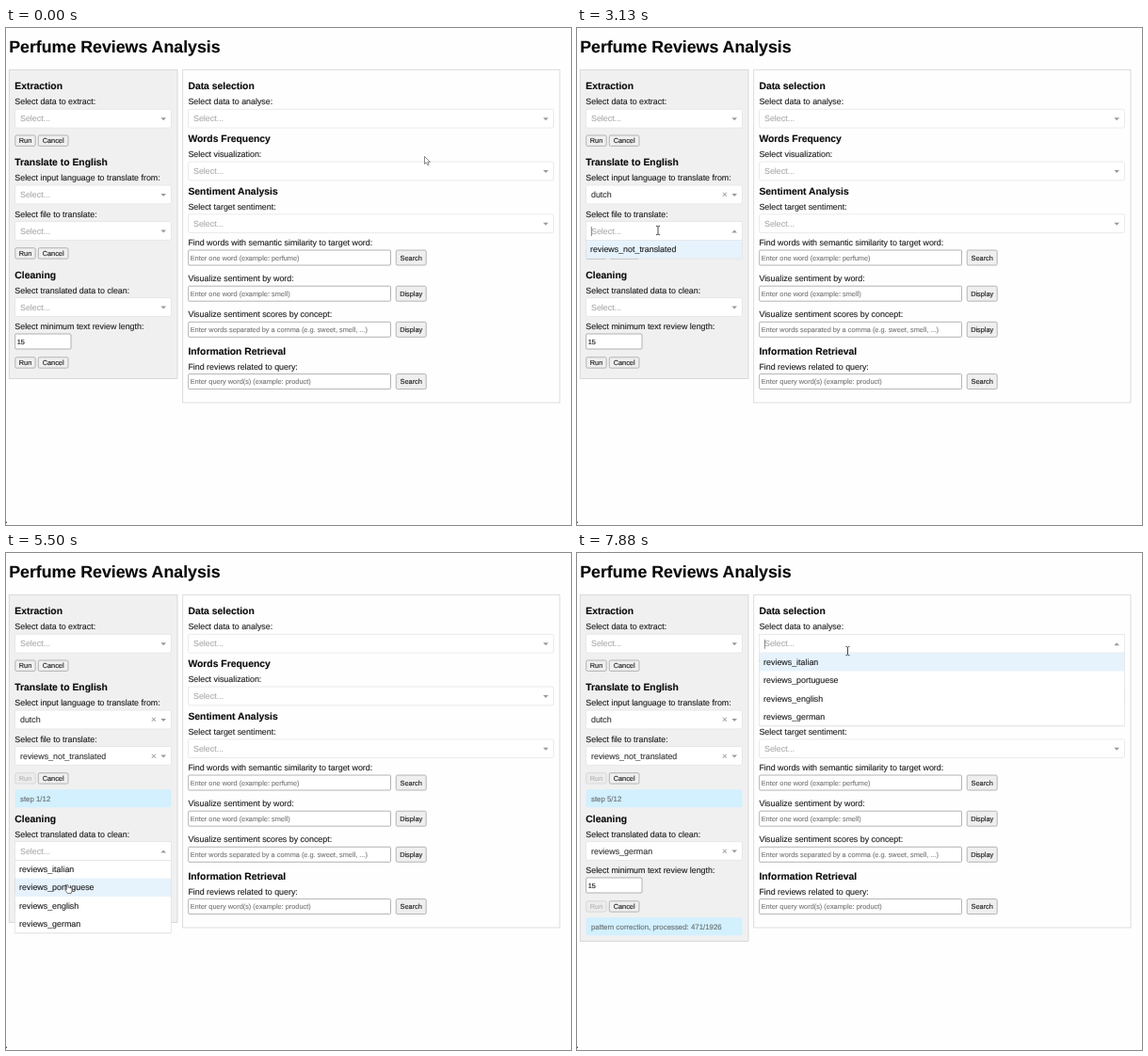
Animation, 600 px wide and 528 px high, one loop 8 s. Source, as an HTML page:

```html
<!DOCTYPE html>
<html lang="en">
<head>
<meta charset="utf-8">
<title>Perfume Reviews Analysis</title>
<style>
  html, body { margin: 0; width: 100%; height: 100%; overflow: hidden; background: #fefefe; }
  svg { display: block; width: 600px; height: 528px; }
  text { font-family: "Liberation Sans", Arial, sans-serif; text-rendering: geometricPrecision; white-space: pre; stroke-width: .12px; }
</style>
</head>
<body>
<svg id="stage" viewBox="0 0 600 528" xmlns="http://www.w3.org/2000/svg"></svg>
<script>
const stage = document.getElementById("stage");
const LOOP = 8000, TICK = 125;
const TITLE = 17.77, HEAD = 10.39, BODY = 8.88, SMALL = 7.37, ROW = 19.28;
const LEFT = { x: 9.5, w: 166 }, RIGHT = { x: 193.5, w: 388 };

const languages = ["spanish", "portuguese", "russian", "french", "german", "dutch", "italian", "chinese", "japanese"];
const reviews = ["italian", "portuguese", "english", "german"].map(n => "reviews_" + n);
const rawFile = "reviews_not_translated";

// Time, tip x, tip y, shape
const pointer = [
  [0, 444.5, 136.5, "arrow"], [750, 302.5, 158.5, "arrow"], [1000, 161, 176.5, "arrow"],
  [1625, 142, 203, "hand"], [1750, 112, 232, "hand"], [1875, 88, 252, "hand"], [2000, 80.5, 256, "hand"],
  [2625, 81, 250, "arrow"], [2750, 84, 232, "arrow"], [2875, 86, 215, "beam"],
  [3250, 84, 232, "hand"], [3500, 54, 230, "arrow"], [3625, 27, 237, "hand"], [3750, 22.5, 239, "hand"],
  [4000, 23, 241, "arrow"], [4250, 26, 254, "arrow"], [4500, 35, 282, "arrow"], [4625, 46, 302, "arrow"],
  [4875, 58.5, 323, "beam"], [5250, 60, 332, "hand"], [5375, 62, 342, "hand"], [5500, 64, 352, "hand"],
  [5750, 67, 371, "hand"], [5875, 69, 384, "hand"], [6000, 69.5, 391, "hand"],
  [6375, 52, 386, "arrow"], [6625, 19, 371, "hand"], [6750, 18, 370.5, "hand"],
  [7000, 38, 352, "arrow"], [7125, 94, 285, "arrow"], [7250, 175, 208, "arrow"], [7375, 243, 148.5, "arrow"],
  [7500, 268, 122, "arrow"], [7625, 285, 105, "beam"], [7750, 287.5, 104, "beam"]
];
const openMenu = [[0, ""], [1250, "lang"], [2500, ""], [3125, "file"], [3375, ""],
  [4875, "clean"], [6250, ""], [7875, "data"]];
const scrolls = [[0, 0], [2000, 14], [2125, 33.1]];
const translateLog = [[0, ""], [3750, "Processing..."], [4000, "Loading translator for 'dutch'..."],
  [5250, "step 1/12"], [5875, "step 2/12"], [6375, "step 3/12"], [6750, "step 4/12"], [7250, "step 5/12"]];
const carets = [[0, false], [1250, true], [1625, false], [3125, true], [3250, false],
  [4875, true], [5250, false], [7875, true]];

const held = (keys, t) => keys.filter(k => k[0] <= t).pop();
const value = (keys, t) => held(keys, t)[1];

function text(x, mid, s, size = BODY, fill = "#1c1c1c", more = "") {
  return `<text x="${x}" y="${mid + size * 0.36}" font-size="${size}" fill="${fill}" stroke="${fill}" ${more}>${s}</text>`;
}
const heading = (x, mid, s) => text(x, mid, s, HEAD, "#0c0c0c", 'font-weight="700"');

function rect(x, y, w, h, fill, stroke = "none", r = 0, more = "") {
  return `<rect x="${x}" y="${y}" width="${w}" height="${h}" rx="${r}" fill="${fill}" stroke="${stroke}" ${more}/>`;
}

function button(x, mid, w, h, label, off) {
  return rect(x, mid - h / 2, w, h, off ? "#ececec" : "#efefef", off ? "#cfcfcf" : "#9a9a9a", 1.5, 'stroke-width=".7"') +
    text(x + w / 2, mid, label, SMALL, off ? "#b4b4b4" : "#1a1a1a", 'text-anchor="middle"');
}
const runCancel = (mid, off) => button(9.8, mid, 21.4, 11.4, "Run", off) + button(34.3, mid, 31.7, 11.4, "Cancel");

function field(x, mid, w, label, fill = "#777") {
  return rect(x, mid - 8, w, 16, "#fff", "#a0a0a0", 1, 'stroke-width=".8"') + text(x + 2, mid, label, SMALL, fill);
}
const search = (mid, hint, label) => field(193.7, mid, 214.8, hint) + button(414.2, mid, 32, 16, label);

function triangle(x, y, up) {
  const d = up ? -1.5 : 1.5;
  return `<path d="M${x - 2.8} ${y - d}h5.6l-2.8 ${2 * d}z" fill="#999"/>`;
}

function select(col, mid, chosen, open, caret) {
  const end = col.x + col.w;
  let s = rect(col.x, mid - 9.9, col.w, 19.8, "#fff", "#dcdcdc", open ? 0 : 2, 'stroke-width=".6"') +
    text(col.x + 5.5, mid, chosen || "Select...", BODY, chosen ? "#333" : "#aaa") +
    triangle(end - 8.3, mid + 0.5, open);
  if (chosen) s += text(end - 18.6, mid - 0.3, "×", 9.9, "#999", 'text-anchor="middle"');
  if (caret) s += rect(col.x + 5.4, mid - 4.4, 0.7, 10, "#555");
  return s;
}

function menu(col, mid, options, tipY, scroll = 0) {
  const top = mid + 10, full = options.length * ROW, h = Math.min(full, 110.8);
  const over = tipY > top && tipY < top + h ? Math.floor((tipY - top + scroll) / ROW) : 0;
  let rows = "";
  options.forEach((name, i) => {
    const y = top + i * ROW - scroll;
    if (i === over) rows += rect(col.x, y, col.w, ROW, "#e6f2fc");
    rows += text(col.x + 4.6, y + ROW / 2, name, BODY, "#1c1c1c");
  });
  if (full > h) rows += scrollbar(col.x + col.w - 8.5, top, h, full, scroll);
  return rect(col.x, top, col.w, h, "#fff", "#dedede", 0, 'stroke-width=".6" filter="url(#soft)"') +
    `<clipPath id="clip">${rect(col.x + 0.3, top, col.w - 0.6, h - 0.3, "#000")}</clipPath>` +
    `<g clip-path="url(#clip)">${rows}</g>`;
}

function scrollbar(x, top, h, full, scroll) {
  const track = h - 19, y = top + 9.5 + scroll / full * track * 1.15;
  return rect(x, top, 8.5, h, "#fbfbfb") + rect(x + 1.8, y, 4.8, track * h / full, "#8b8b8b", "none", 2.4) +
    `<path d="M${x + 1.5} ${top + 7.5}h5.4l-2.7-3.6zM${x + 1.5} ${top + h - 8}h5.4l-2.7 3.6z" fill="#7c7c7c"/>`;
}

const notice = (mid, s) => rect(9.5, mid - 9.5, 166, 19, "#d2f0fd", "none", 2) + text(15, mid, s, 7.85, "#6a6f72");

function cursor([, x, y, shape]) {
  const art = {
    arrow: '<path d="M0 0v8l1.9-1.7 1.3 2.9 1.4-.6-1.3-2.8h2.6z" fill="#fff" stroke="#555" stroke-width=".7"/>',
    hand: '<path d="M.4 5.6V.8q.8-1 1.6 0v2.6q.8-.5 1.4.2.8-.4 1.3.3 1-.3 1.3.7v2.6l-.9 2.4H1.4L-1.2 6q.2-1.2 1.6-.4z" fill="#fff" stroke="#444" stroke-width=".7"/>',
    beam: '<path d="M-2-4.7q1.6 0 2 .8.4-.8 2-.8M0-3.9v7.8M-2 4.7q1.6 0 2-.8.4.8 2 .8" fill="none" stroke="#333" stroke-width=".9"/>'
  };
  return `<g transform="translate(${x} ${y})">${art[shape]}</g>`;
}

function leftPanel(t, open, caret) {
  const log = value(translateLog, t), cleaning = t >= 6750;
  const dy = log ? 20 : 0, n = Math.round(471 * (t - 7000) / 875);
  const cleanLog = t < 7125 ? "Processing..." : `pattern correction, processed: ${n}/1926`;
  const pick = (id, mid, chosen) => select(LEFT, mid, chosen, open === id, open === id && caret);
  return rect(3.3, 44.3, 178.7, 328.3 + dy + (cleaning ? 20 : 0), "#f1f0f1", "#d2d2d4", 0, 'stroke-width=".8"') +
    heading(9.3, 61.5, "Extraction") + text(9.3, 78, "Select data to extract:") +
    pick("extract", 96.2) + runCancel(119.7) +
    heading(9.3, 142.7, "Translate to English") + text(9.3, 159, "Select input language to translate from:") +
    pick("lang", 177, t >= 2500 && "dutch") +
    text(9.3, 197.7, "Select file to translate:") + pick("file", 215.5, t >= 3375 && rawFile) +
    runCancel(239.4, log) + (log && notice(260.7, log)) +
    heading(9.3, 262 + dy, "Cleaning") + text(9.3, 278.4 + dy, "Select translated data to clean:") +
    pick("clean", 296.5 + dy, t >= 6250 && "reviews_german") +
    text(9.3, 316.8 + dy, "Select minimum text review length:") +
    field(9.7, 333 + dy, 59.3, "15", "#111") + runCancel(355.5 + dy, cleaning) +
    (cleaning ? notice(396.8, cleanLog) : "");
}

function rightPanel(open, caret) {
  const x = 193.4;
  return rect(187.7, 44.3, 400.3, 353.7, "#fefefe", "#d4d4d8", 0, 'stroke-width=".8"') +
    heading(x, 61.5, "Data selection") + text(x, 78, "Select data to analyse:") +
    select(RIGHT, 96.2, "", open === "data", open === "data" && caret) +
    heading(x, 117.5, "Words Frequency") + text(x, 133.7, "Select visualization:") + select(RIGHT, 152, "") +
    heading(x, 173.5, "Sentiment Analysis") + text(x, 189.6, "Select target sentiment:") + select(RIGHT, 207.7, "") +
    text(x, 227.7, "Find words with semantic similarity to target word:") +
    search(244, "Enter one word (example: perfume)", "Search") +
    text(x, 266, "Visualize sentiment by word:") + search(282.2, "Enter one word (example: smell)", "Display") +
    text(x, 303.8, "Visualize sentiment scores by concept:") +
    search(320.3, "Enter words separated by a comma (e.g. sweet, smell, ...)", "Display") +
    heading(x, 343, "Information Retrieval") + text(x, 359.5, "Find reviews related to query:") +
    search(375.6, "Enter query word(s) (example: product)", "Search");
}

function draw(t) {
  const open = value(openMenu, t), caret = value(carets, t), tip = held(pointer, t);
  const menus = {
    lang: () => menu(LEFT, 177, languages, tip[2], value(scrolls, t)),
    file: () => menu(LEFT, 215.5, [rawFile], tip[2]),
    clean: () => menu(LEFT, 316.3, reviews, tip[2]),
    data: () => menu(RIGHT, 96.2, reviews, tip[2])
  };
  stage.innerHTML =
    '<filter id="soft" x="-5%" y="-5%" width="110%" height="115%"><feDropShadow dx="0" dy=".5" stdDeviation=".6" flood-opacity=".1"/></filter>' +
    rect(0, 0, 600, 528, "#fefefe") +
    text(3.2, 19.8, "Perfume Reviews Analysis", TITLE, "#080808", 'font-weight="700"') +
    leftPanel(t, open, caret) + rightPanel(open, caret) +
    (open ? menus[open]() : "") + cursor(tip) + rect(0, 524.5, 1, 1.5, "#555");
}

let shown = -1;
function frame() {
  const tick = Math.floor(performance.now() % LOOP / TICK);
  if (tick !== shown) draw((shown = tick) * TICK);
  requestAnimationFrame(frame);
}
frame();
</script>
</body>
</html>
```
